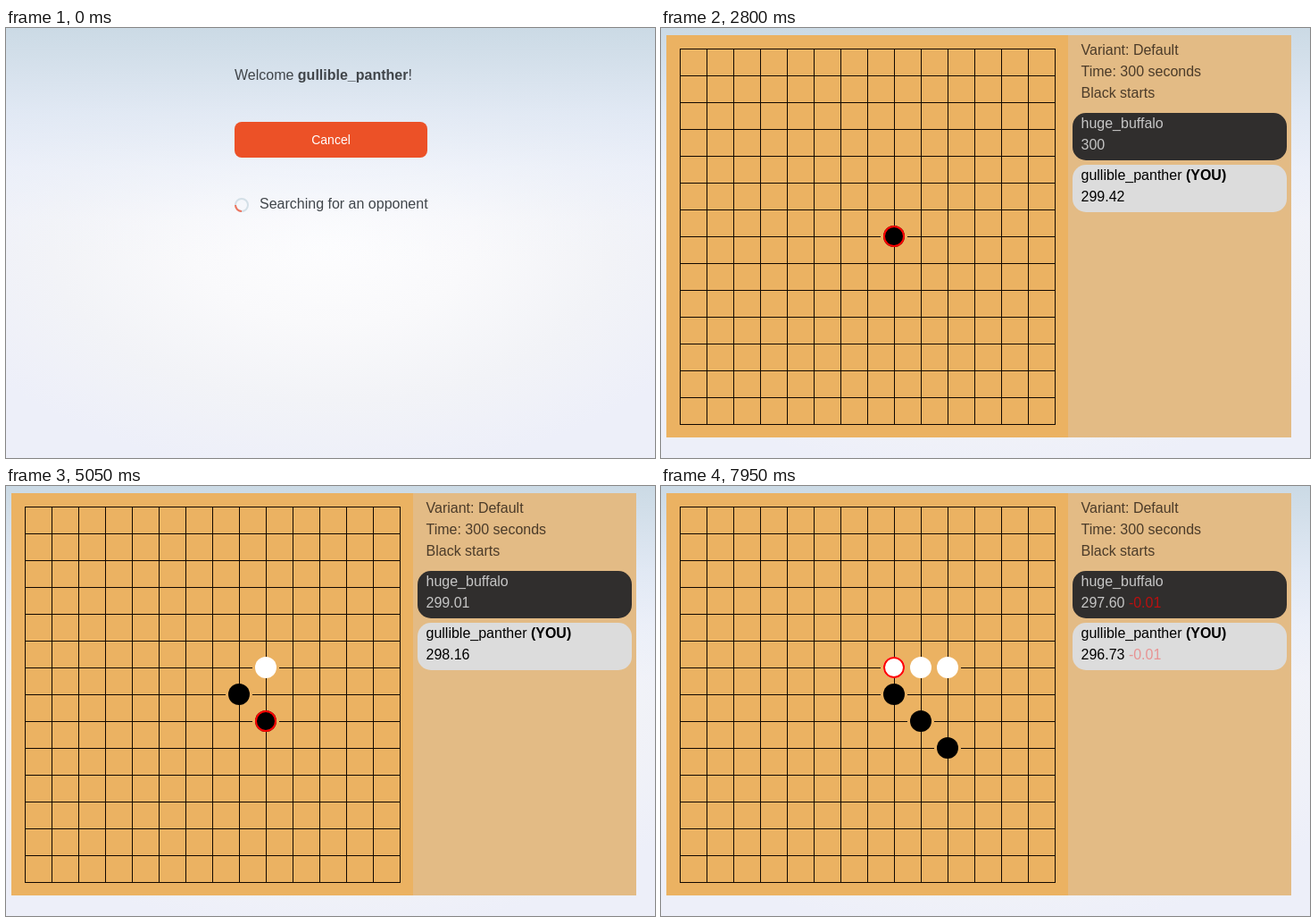
An HTML page for the animation above (8 s loop, 727 by 481 pixels).

```html
<!DOCTYPE html>
<html lang="en">
<head>
<meta charset="utf-8">
<title>Five in a row</title>
<style>
  html, body { margin: 0; width: 100%; height: 100%; overflow: hidden; }
  body {
    background:
      linear-gradient(rgb(203,218,229) 0, rgba(212,224,235,.94) 45px, rgba(222,231,243,.82) 95px,
        rgba(232,238,249,.58) 155px, rgba(240,243,251,.2) 215px, rgba(244,246,252,0) 260px),
      radial-gradient(460px 260px at 364px 240px, #fdfdfe 0, #f9f9fb 35%, #f2f3f7 68%, #edeff9 100%);
  }
  svg { display: block; width: 727px; height: 481px; }
  text { font: 16px "Liberation Sans", Arial, sans-serif; white-space: pre; }
  .b { font-weight: bold; }
  .lobby { fill: #40454a; }
  .info { fill: #4b3b29; }
  .dark { fill: #c6c6c6; }
  .tag { fill: #f00; }
</style>
</head>
<body>
<svg viewBox="0 0 727 481">
  <g id="lobby">
    <text class="lobby" x="256" y="58">Welcome <tspan class="b">gullible_panther</tspan>!</text>
    <rect x="256" y="105" width="216" height="40" rx="8" fill="#ec5127"/>
    <text x="364" y="130" text-anchor="middle" fill="#fff" style="font-size:14px">Cancel</text>
    <g fill="none" stroke-width="2">
      <circle cx="264" cy="198" r="7" stroke="#d3dfe7"/>
      <path id="spin" d="M264 205A7 7 0 0 1 257 198" stroke="#ee745d"/>
    </g>
    <text class="lobby" x="284" y="202">Searching for an opponent</text>
  </g>
  <g id="game">
    <rect x="6" y="8" width="450" height="450" fill="#ebb262"/>
    <rect x="456" y="8" width="250" height="450" fill="#e3bb85"/>
    <g id="rows"></g>
    <g id="gaps"></g>
    <g id="cols"></g>
    <g id="stones"></g>
    <text class="info" x="470.5" y="30">Variant: Default</text>
    <text class="info" x="470.5" y="54">Time: 300 seconds</text>
    <text class="info" x="470.5" y="78">Black starts</text>
    <rect x="461" y="95" width="240" height="53" rx="15" fill="#302e2d"/>
    <text class="dark" x="470.5" y="112">huge_buffalo</text>
    <text class="dark" x="470.5" y="136"><tspan class="clock">300</tspan> <tspan class="tag">-0.01</tspan></text>
    <rect x="461" y="153" width="240" height="53" rx="15" fill="#dcdcdc"/>
    <text x="470.5" y="170">gullible_panther <tspan class="b">(YOU)</tspan></text>
    <text x="470.5" y="194"><tspan class="clock">300</tspan> <tspan class="tag">-0.01</tspan></text>
  </g>
</svg>
<script>
const LOOP = 8000, TICK = 50, GAME_START = 1300, FADE = 150, CELL = 30;
const BLACK = 0;

// at: when the stone lands; lead: clock offset; spent: thinking time of the reply
const moves = [
  { col: 8,  row: 7, at: 2250, lead: 30,  spent: 890 },
  { col: 9,  row: 6, at: 3150, lead: 40,  spent: 990 },
  { col: 9,  row: 8, at: 4100, lead: 0,   spent: 1270 },
  { col: 10, row: 6, at: 5400, lead: -10, spent: 1410 },
  { col: 10, row: 9, at: 6850, lead: 30,  spent: 1110 },
  { col: 8,  row: 6, at: 7950, lead: 0,   spent: 0 }
];

const $ = id => document.getElementById(id);
const clocks = document.querySelectorAll('.clock');
const tags = document.querySelectorAll('.tag');
const clamp = (v, lo, hi) => Math.max(lo, Math.min(hi, v));

function add(parent, name, attrs) {
  const el = document.createElementNS('http://www.w3.org/2000/svg', name);
  for (const key in attrs) el.setAttribute(key, attrs[key]);
  return parent.appendChild(el);
}

const gridX = i => 21 + i * CELL;
const gridY = i => 23 + i * CELL;
const show = (el, on) => el.setAttribute('visibility', on ? 'visible' : 'hidden');

for (let i = 0; i < 15; i++) {
  add($('rows'), 'rect', { x: 21, y: gridY(i), width: 421, height: 1, fill: '#120800' });
  add($('cols'), 'rect', { x: gridX(i), y: 23, width: 1, height: 421, fill: '#120800' });
}

moves.forEach((m, i) => {
  const x = gridX(m.col), y = gridY(m.row), fill = i % 2 === BLACK ? '#000' : '#fff';
  m.gap = add($('gaps'), 'rect', { x: x - 15, y, width: CELL, height: 1, fill: '#ebb262' });
  m.stone = add($('stones'), 'circle', { cx: x, cy: y, r: 12, fill });
  m.ring = add($('stones'), 'circle', { cx: x, cy: y, r: 11, fill: 'none', stroke: '#f00', 'stroke-width': 2 });
});

function drawClocks(t) {
  const used = [0, 0], alpha = [0, 0];
  const ramp = at => clamp((t - at + TICK) / FADE, 0, 1);
  moves.forEach((m, i) => {
    if (t < m.at) return;
    const player = (i + 1) % 2, next = moves[i + 1], after = moves[i + 2];
    if (next && t >= next.at) {
      used[player] += m.spent;
      // the correction stays up until this player's clock runs again
      if (i >= 2) alpha[player] = ramp(next.at) - (after && t >= after.at ? ramp(after.at) : 0);
    } else if (t > m.at) {
      used[player] += clamp(t - m.at + m.lead, 0, m.spent);
    }
  });
  used.forEach((ms, p) => {
    clocks[p].textContent = ms ? (300 - ms / 1000).toFixed(2) : '300';
    tags[p].setAttribute('fill-opacity', alpha[p]);
  });
}

function draw(t) {
  const playing = t >= GAME_START;
  $('lobby').style.display = playing ? 'none' : '';
  $('game').style.display = playing ? '' : 'none';
  $('spin').setAttribute('transform', `rotate(${t * 0.36} 264 198)`);
  moves.forEach((m, i) => {
    const placed = t >= m.at, next = moves[i + 1];
    show(m.gap, placed);
    show(m.stone, placed);
    show(m.ring, placed && !(next && t >= next.at));
  });
  drawClocks(t);
}

const start = performance.now();
function frame() {
  const t = (performance.now() - start) % LOOP;
  draw(Math.floor(t / TICK) * TICK);
  requestAnimationFrame(frame);
}
frame();
</script>
</body>
</html>
```
